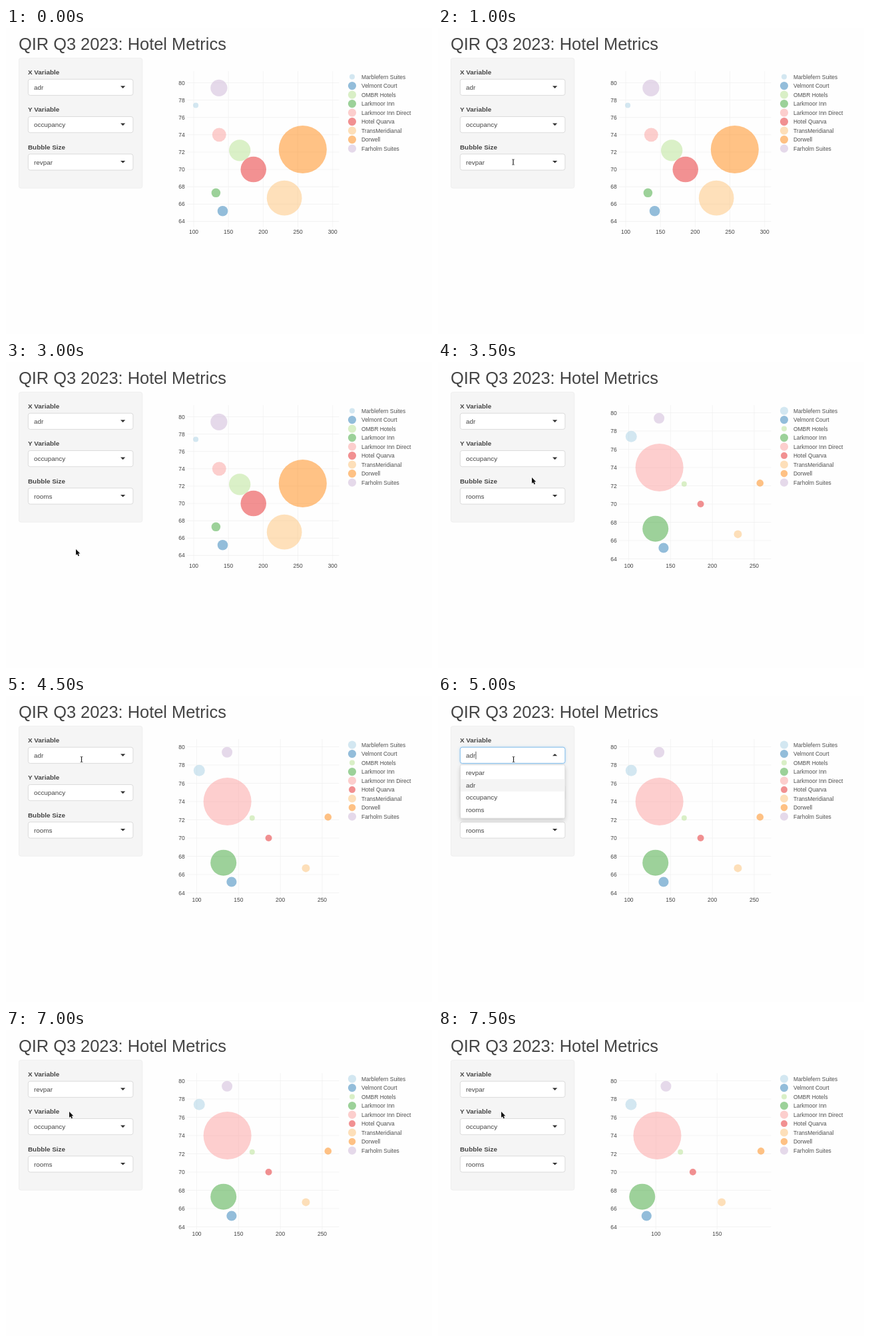
Write an HTML page with a canvas that moves like this. It is 640 px wide and 461 px high and loops after 8000 ms.

```html
<!DOCTYPE html>
<html lang="en">
<head>
<meta charset="utf-8">
<title>Hotel Metrics</title>
<style>
html, body { margin: 0; width: 640px; height: 461px; overflow: hidden; background: #fefefe; }
canvas { display: block; }
</style>
</head>
<body>
<canvas width="640" height="461"></canvas>
<script>
const ctx = document.querySelector('canvas').getContext('2d');
const STEP = 500, STEPS = 16;
const OPTIONS = ['revpar', 'adr', 'occupancy', 'rooms'];

// name, colour, average rate, occupancy, radius by rooms
const hotels = [
  ['Marblefern Suites', '#a6cee3', 103, 77.4, 8.5],
  ['Velmont Court', '#1f78b4', 141.7, 65.2, 7.6],
  ['OMBR Hotels', '#b2df8a', 166.3, 72.2, 4],
  ['Larkmoor Inn', '#33a02c', 132, 67.3, 19.5],
  ['Larkmoor Inn Direct', '#fb9a99', 136.7, 74, 36],
  ['Hotel Quarva', '#e31a1c', 186, 70, 5],
  ['TransMeridianal', '#fdbf6f', 230.5, 66.7, 6],
  ['Dorwell', '#ff7f00', 257, 72.3, 5.3],
  ['Farholm Suites', '#cab2d6', 136.3, 79.4, 8]
].map(([name, color, adr, occupancy, roomR]) => {
  const revpar = adr * occupancy / 100;
  return { name, color, adr, revpar, occupancy, roomR, revparR: 4 + 32 * (revpar - 79.7) / 106 };
});

// x and y map a value to pixels: [start value, start pixel, pixels per unit]
const charts = [
  { xVar: 'adr', size: 'revparR', x: [100, 282, 1.0435], y: [80, 82.5, -13.06], ticks: [100, 150, 200, 250, 300] },
  { xVar: 'adr', size: 'roomR', x: [100, 286.5, 1.2567], y: [80, 76.5, -13.75], ticks: [100, 150, 200, 250] },
  { xVar: 'revpar', size: 'roomR', x: [100, 327.3, 1.84], y: [80, 76.5, -13.75], ticks: [100, 150] }
];

// pointer for each half second: shape, x, y
const pointers = [
  null, ['arrow', 150, 172], ['beam', 113, 202], ['beam', 113, 202],
  ['hand', 112, 264], ['arrow', 105, 282], ['arrow', 105, 282], ['arrow', 141, 174],
  ['arrow', 119, 112], ['beam', 113.5, 95.5], ['beam', 113.5, 95.5], ['hand', 104, 129],
  ['hand', 92, 129], ['hand', 92, 111], ['arrow', 95, 123], ['arrow', 95, 123]
];

function text(str, x, y, size, color = '#444', align = 'left', weight = '') {
  ctx.font = `${weight} ${size}px "Liberation Sans", Arial, sans-serif`;
  ctx.fillStyle = color;
  ctx.textAlign = align;
  ctx.fillText(str, x, y);
}

function box(x, y, w, h, r, fill, stroke) {
  ctx.beginPath();
  ctx.roundRect(x, y, w, h, r);
  ctx.fillStyle = fill;
  ctx.fill();
  ctx.shadowColor = 'transparent';
  ctx.strokeStyle = stroke;
  ctx.lineWidth = 0.8;
  ctx.stroke();
}

function shape(points, fill) {
  ctx.beginPath();
  points.forEach(([x, y]) => ctx.lineTo(x, y));
  ctx.closePath();
  ctx.fillStyle = fill;
  ctx.fill();
}

function dot(x, y, r, color) {
  ctx.globalAlpha = 0.48;
  ctx.beginPath();
  ctx.arc(x, y, r, 0, 7);
  ctx.fillStyle = color;
  ctx.fill();
  ctx.globalAlpha = 1;
}

function line(x1, y1, x2, y2, color, width) {
  ctx.beginPath();
  ctx.moveTo(x1, y1);
  ctx.lineTo(x2, y2);
  ctx.strokeStyle = color;
  ctx.lineWidth = width;
  ctx.stroke();
}

// applies to the next box only
function shadow(color, blur, dy = 0) {
  ctx.shadowColor = color;
  ctx.shadowBlur = blur;
  ctx.shadowOffsetY = dy;
}

function select(label, value, y, open) {
  text(label, 33, y - 7.3, 9.87, '#444', 'left', 'bold');
  if (open) shadow('rgba(102,175,233,.4)', 4);
  box(33.3, y, 157.6, 24.2, 3, '#fff', open ? '#66afe9' : '#d4d4d4');
  text(value, 42, y + 15.6, 9.87);
  const dy = y + 12 + (open ? 1 : -2), tip = open ? -3.3 : 3.7;
  shape([[172, dy], [179.2, dy], [175.6, dy + tip]], '#333');
  if (open) {
    const end = 42.7 + ctx.measureText(value).width;
    line(end, y + 6.5, end, y + 18, '#333', 0.8);
  }
}

function menu(y, active) {
  shadow('rgba(0,0,0,.18)', 6, 3);
  box(33.4, y + 26.5, 157.4, 80.5, 2, '#fff', '#d8d8d8');
  OPTIONS.forEach((name, i) => {
    const mid = y + 38.8 + 18.5 * i;
    if (name === active) {
      ctx.fillStyle = '#f4f4f4';
      ctx.fillRect(34, mid - 9.2, 156.4, 18.4);
    }
    text(name, 42, mid + 3.2, 9.87);
  });
}

function chart({ xVar, size, x, y, ticks }) {
  const at = ([v0, p0, k], v) => p0 + (v - v0) * k;
  for (const v of ticks) {
    const px = at(x, v);
    line(px, 65, px, 300, '#f1f1f1', 0.8);
    text(v, px, 309.6, 8.46, '#444', 'center');
  }
  for (let v = 64; v <= 80; v += 2) {
    const py = at(y, v);
    line(272, py, 500.5, py, '#f0f0f0', 0.8);
    text(v, 268.6, py + 3, 8.46, '#444', 'right');
  }
  hotels.forEach((h, i) => {
    dot(at(x, h[xVar]), at(y, h.occupancy), h[size], h.color);
    const ly = 73.6 + 13.5 * i;
    dot(520, ly, Math.min(h[size], 6.1), h.color);
    text(h.name, 534, ly + 3, 8.46, '#505050');
  });
}

function pointer(kind, x, y) {
  ctx.save();
  ctx.translate(x, y);
  if (kind === 'beam') {
    line(0, -4, 0, 4, '#222', 1.2);
    line(-2, -4, 2, -4, '#444', 0.7);
    line(-2, 4, 2, 4, '#444', 0.7);
  } else {
    const points = kind === 'arrow'
      ? [[0, 0], [0, 9], [2, 7.2], [3.5, 10.5], [5, 9.8], [3.6, 6.6], [6.4, 6.4]]
      : [[0, 0], [1.4, 0], [2.4, 2.6], [5.6, 3.2], [6.4, 4.4], [6, 8.4], [1.6, 8.4], [-1.2, 5.4], [-0.4, 4.4], [1, 4.8]];
    ctx.beginPath();
    points.forEach(([px, py]) => ctx.lineTo(px, py));
    ctx.closePath();
    ctx.strokeStyle = '#fff';
    ctx.lineWidth = 1;
    ctx.stroke();
    shape(points, '#111');
  }
  ctx.restore();
}

function draw(n) {
  const sizeOpen = n === 3 || n === 4, xOpen = n >= 10 && n <= 13;
  ctx.fillStyle = '#fefefe';
  ctx.fillRect(0, 0, 640, 461);
  text('QIR Q3 2023: Hotel Metrics', 19, 33.2, 25.4);
  box(19.4, 45.4, 185.4, 195.8, 3, '#f5f5f5', '#ededed');
  select('X Variable', n < 14 ? 'adr' : 'revpar', 77.2, xOpen);
  select('Y Variable', 'occupancy', 133.5, false);
  select('Bubble Size', n < 5 ? 'revpar' : 'rooms', 189.9, sizeOpen);
  if (sizeOpen) menu(189.9, n === 3 ? 'revpar' : 'occupancy');
  if (xOpen) menu(77.2, n === 13 ? 'revpar' : 'adr');
  chart(charts[n < 7 ? 0 : n < 15 ? 1 : 2]);
  if (pointers[n]) pointer(...pointers[n]);
}

function tick() {
  draw(Math.floor(performance.now() / STEP) % STEPS);
  requestAnimationFrame(tick);
}
tick();
</script>
</body>
</html>
```
